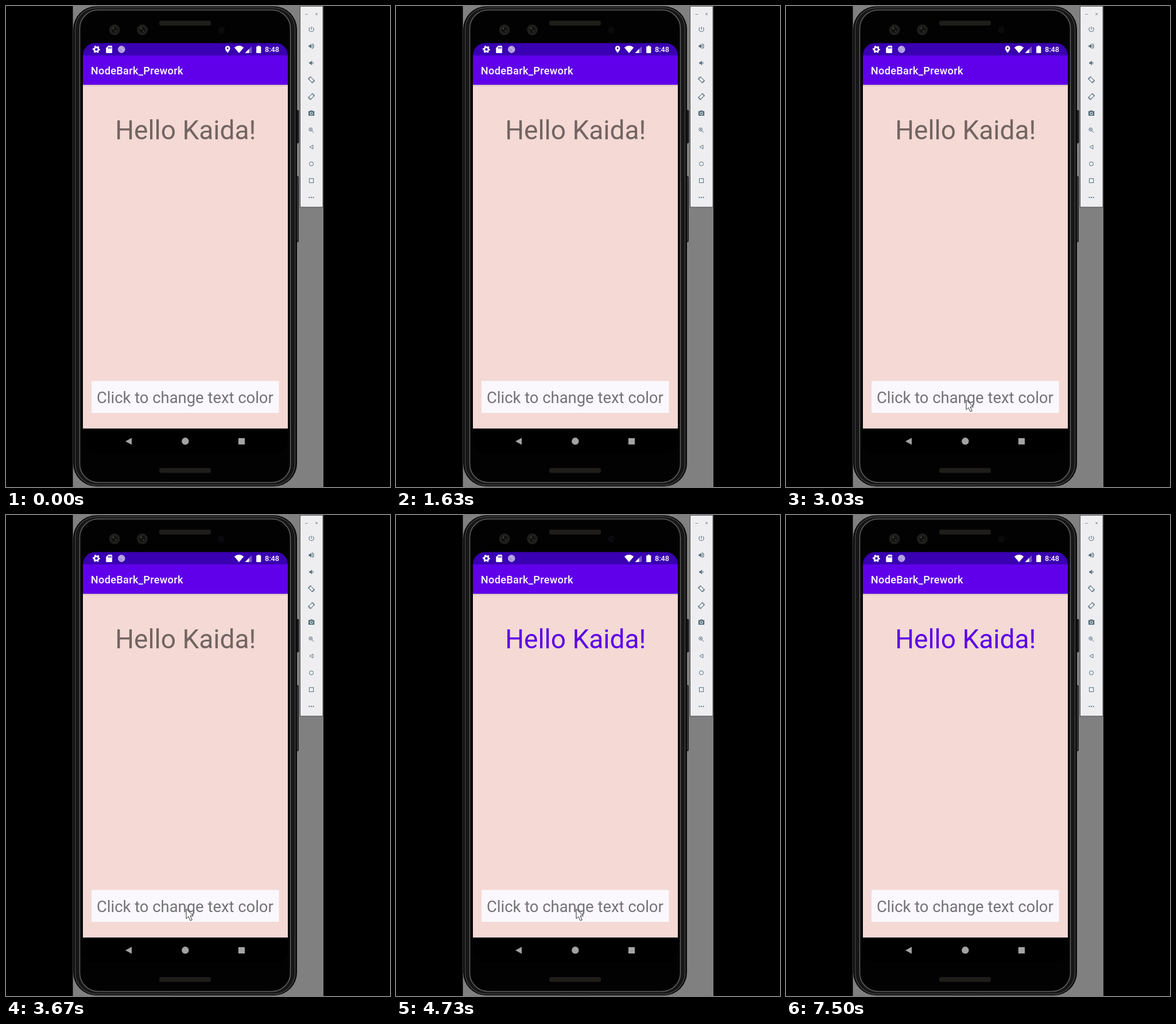
Write an HTML page that moves like this. It is 669 px wide and 837 px high and loops after 7.73 s.

```html
<!DOCTYPE html>
<html lang="en">
<head>
<meta charset="utf-8">
<title>Phone emulator</title>
<style>
  html, body { margin: 0; width: 100%; height: 100%; overflow: hidden; background: #000; }
  svg { display: block; width: 669px; height: 837px; }
  text { font-family: Roboto, "Open Sans", sans-serif; }
  .medium { font-weight: 500; fill: #fff; }
  .line { fill: none; stroke: #546e7a; stroke-width: 1.9; }
</style>
</head>
<body>
<svg viewBox="0 0 669 837">
  <defs>
    <linearGradient id="shade" x1="0" y1="0" x2="0" y2="1">
      <stop offset="0" stop-color="#9a8694" stop-opacity=".55"/>
      <stop offset="1" stop-color="#f4d9d5" stop-opacity="0"/>
    </linearGradient>
    <clipPath id="screen"><rect x="134" y="64.5" width="357" height="714" rx="21"/></clipPath>
  </defs>

  <rect width="669" height="837"/>
  <rect x="116.5" width="436.5" height="837" fill="#808080"/>

  <!-- phone body -->
  <g>
    <rect x="504" y="181" width="6.5" height="58" rx="2" fill="#191919"/>
    <rect x="504" y="296" width="6" height="115" rx="2" fill="#222"/>
    <path d="M507.5 298V408" stroke="#484848"/>
    <rect x="117" y=".5" width="390" height="835.5" rx="40" fill="#0b0b0b"/>
    <rect x="120.5" y="3" width="383" height="830.5" rx="37" fill="#161616" stroke="#414141" stroke-width="1.5"/>
    <rect x="128.5" y="7" width="367" height="822" rx="32" fill="#020202" stroke="#5c5c5c" stroke-width="1.6"/>
    <path d="M290 836.2H335" stroke="#555"/>
    <g fill="#1e1d1a">
      <rect x="267" y="25.5" width="90" height="8.5" rx="3"/>
      <rect x="267" y="804" width="90" height="8.5" rx="3"/>
    </g>
    <g id="lenses"></g>
    <circle cx="375" cy="42" r="6" fill="#0a0a0c"/>
  </g>

  <!-- app screen -->
  <g clip-path="url(#screen)">
    <rect x="134" y="64" width="357" height="22.5" fill="#3900b1"/>
    <rect x="134" y="86" width="357" height="51" fill="#6000ea"/>
    <rect x="134" y="137" width="357" height="598.5" fill="#f4d9d5"/>
    <rect x="134" y="137" width="357" height="4" fill="url(#shade)"/>
    <rect x="134" y="735.5" width="357" height="44"/>
  </g>
  <text class="medium" x="147.8" y="119" font-size="18.2" letter-spacing=".3">NodeBark_Prework</text>
  <text id="greeting" x="190.2" y="232" font-size="46">Hello Kaida!</text>
  <rect x="149" y="652.5" width="326.5" height="55.5" fill="#faf8fd"/>
  <text x="158" y="691" font-size="27.4" fill="#737275">Click to change text color</text>
  <g fill="#a3a3a3">
    <path d="M208 757.5L219 751.5V763.5Z"/>
    <circle cx="312.3" cy="757.3" r="6.2"/>
    <rect x="404.8" y="752" width="11.2" height="11" rx=".6"/>
  </g>

  <!-- status bar -->
  <g fill="#fff">
    <g transform="translate(157.5 75.5)" fill="none" stroke="#fff">
      <circle r="3.7" stroke-width="2.8"/>
      <circle r="5.4" stroke-width="2.2" stroke-dasharray="2.83 2.825" stroke-dashoffset="1.4"/>
    </g>
    <path fill-rule="evenodd" d="M178.3 69H183.5Q185 69 185 70.5V80.5Q185 82 183.5 82H175.5Q174.2 82 174.2 80.5V73ZM178 71.6V74.2H179.3V71.6ZM180.2 71.6V74.2H181.5V71.6ZM182.4 71.6V74.2H183.7V71.6Z"/>
    <circle cx="201.3" cy="75.5" r="5.7" fill="#a997dc" stroke="#d6ccef"/>
    <path d="M197.3 72.5Q202 72 205 78" fill="none" stroke="#cbbfea" stroke-width="1.3"/>
    <path id="pin" transform="translate(378.7 68) scale(.62)" fill-rule="evenodd" d="M12 2C8.13 2 5 5.13 5 9c0 5.25 7 13 7 13s7-7.75 7-13c0-3.87-3.13-7-7-7zm0 9.5a2.5 2.5 0 0 1 0-5a2.5 2.5 0 0 1 0 5z"/>
    <path d="M397.8 72.3Q406 65.7 414.2 72.3L406 82Z"/>
    <path d="M428.2 70V81.8H416.5Z" fill="#7a55ca"/>
    <path d="M423.5 74.8V81.8H416.5Z"/>
    <path d="M438.7 69H441.7V70.3H443.2Q444.3 70.3 444.3 71.4V80.8Q444.3 82 443.2 82H437.2Q436.1 82 436.1 80.8V71.4Q436.1 70.3 437.2 70.3H438.7Z"/>
  </g>
  <text class="medium" x="451" y="80" font-size="12.7">8:48</text>

  <!-- emulator toolbar -->
  <rect x="512.5" y=".5" width="39.5" height="349.5" fill="#eeeef1" stroke="#4a4a4a"/>
  <path d="M521.5 14.5H525.5M539.2 12.2L543 16M543 12.2L539.2 16" stroke="#777" stroke-width=".9"/>
  <g id="tools" fill="#546e7a" fill-rule="evenodd"></g>

  <path id="cursor" d="M0 0V17L3.9 13.4L7.2 20.3L10.2 19L7 12.2H12.4Z" fill="#fff" stroke="#27272b" stroke-width="1" stroke-linejoin="round"/>
</svg>
<script>
const LOOP = 7730, PIN_OFF = 3400, RECOLOR = 4330;
const byId = id => document.getElementById(id);

byId('lenses').innerHTML = [189, 237.5].map(x => `
  <circle cx="${x}" cy="41.5" r="9.5" fill="#1d1d1c"/>
  <circle cx="${x}" cy="41.5" r="6" fill="#11110f" stroke="#2a2a28"/>
  <circle cx="${x - 2}" cy="39" r="1.4" fill="#4a4a44"/>
  <circle cx="${x + 2}" cy="43.5" r="1.2" fill="#3c3c38"/>`).join('');

const wave = 'c0-1.77-1.02-3.29-2.5-4.03v8.05c1.48-.73 2.5-2.25 2.5-4.02z';
const rotate = flip => `<g class="line" transform="translate(12 12) scale(${flip} 1)">
  <rect x="-5" y="-8" width="10" height="16" rx="1" transform="rotate(-45)"/>
  <path d="M-10.5 -1A10.5 10.5 0 0 1 -1 -10.5M10.5 1A10.5 10.5 0 0 1 1 10.5"/></g>`;

// Each icon sits on a 24-unit grid.
const icons = [
  '<path d="M13 3h-2v10h2zm4.83 2.17l-1.42 1.42A7 7 0 1 1 7.58 6.58L6.17 5.17A9 9 0 1 0 17.83 5.17z"/>',
  `<path d="M3 9v6h4l5 5V4L7 9zM16.5 12${wave}M14 3.23v2.06a7 7 0 0 1 0 13.42v2.06a9 9 0 0 0 0-17.54z"/>`,
  `<path d="M5 9v6h4l5 5V4L9 9zM18.5 12${wave}"/>`,
  rotate(1),
  rotate(-1),
  '<path d="M9 2L7.2 4H4Q2 4 2 6V18Q2 20 4 20H20Q22 20 22 18V6Q22 4 20 4H16.8L15 2zm3 15a5 5 0 0 1 0-10a5 5 0 0 1 0 10z"/><circle cx="12" cy="12" r="3.2"/>',
  '<path class="line" d="M14 14L20.5 20.5M7 9.5H12M9.5 7V12"/><circle class="line" cx="9.5" cy="9.5" r="5.5"/>',
  '<path class="line" d="M17.5 5.5V18.5L6 12Z"/>',
  '<circle class="line" cx="12" cy="12" r="6.8"/>',
  '<rect class="line" x="5" y="5" width="14" height="14"/>',
  '<circle cx="5" cy="12" r="2"/><circle cx="12" cy="12" r="2"/><circle cx="19" cy="12" r="2"/>'
];
byId('tools').innerHTML = icons.map((icon, i) =>
  `<g transform="translate(525.8 ${34.4 + i * 29.25}) scale(.52)">${icon}</g>`).join('');

// Pointer stops: time, x, y.
const stops = [
  [1900, 500, 560], [2130, 353.5, 631], [2400, 353.5, 631],
  [2800, 314, 685.5], [6800, 314, 685.5], [6900, 432, 620]
];
const ease = p => p * p * (3 - 2 * p);

function pointerAt(t) {
  const next = stops.findIndex(stop => stop[0] > t);
  if (next < 1) return null;
  const [t0, x0, y0] = stops[next - 1], [t1, x1, y1] = stops[next];
  const p = ease((t - t0) / (t1 - t0));
  return [x0 + (x1 - x0) * p, y0 + (y1 - y0) * p];
}

function render(t) {
  byId('pin').style.display = t < PIN_OFF ? '' : 'none';
  byId('greeting').setAttribute('fill', t < RECOLOR ? '#726561' : '#5c00e6');
  const spot = pointerAt(t), cursor = byId('cursor');
  cursor.style.display = spot ? '' : 'none';
  if (spot) cursor.setAttribute('transform', `translate(${spot})`);
}

const start = performance.now();
function tick() {
  render((performance.now() - start) % LOOP);
  requestAnimationFrame(tick);
}
tick();
</script>
</body>
</html>
```
